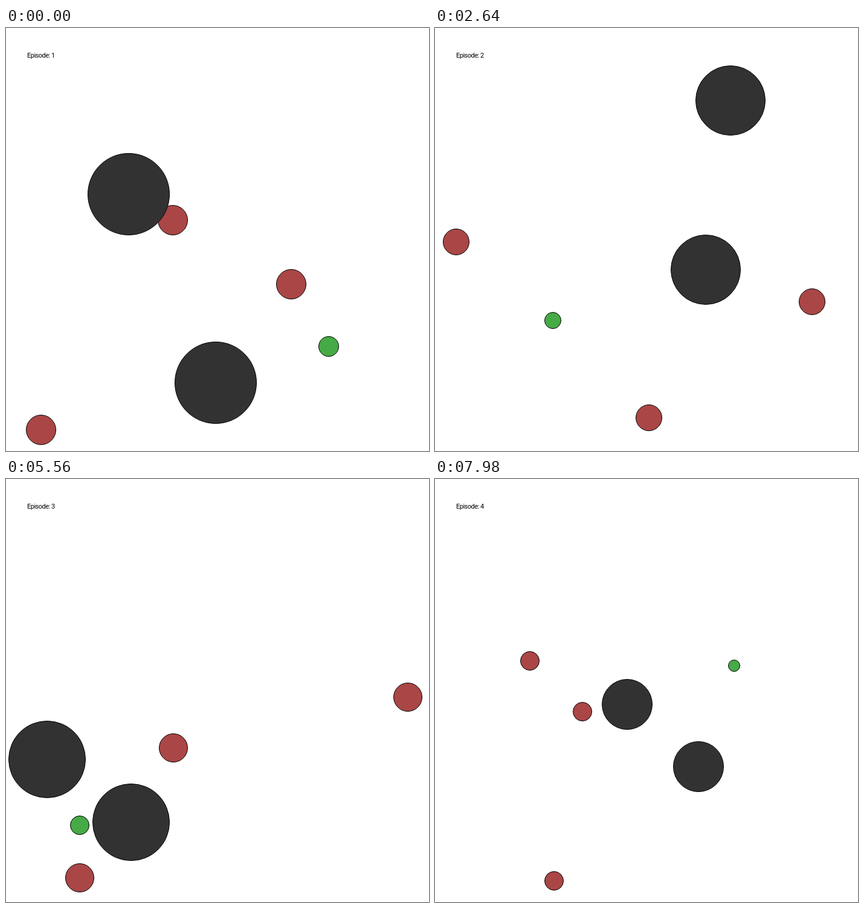
Animation, 700 px wide and 700 px high, one loop 8000 ms. Source, as an HTML page with a canvas:

```html
<!DOCTYPE html>
<html lang="en">
<head>
<meta charset="utf-8">
<title>Pursuit episodes</title>
<style>
  html, body { margin: 0; height: 100%; overflow: hidden; background: #fff; }
  canvas { display: block; }
</style>
</head>
<body>
<canvas id="stage" width="700" height="700"></canvas>
<script>
const ctx = document.getElementById('stage').getContext('2d');
const LOOP = 8000, CENTER = 350, EXTENT = 315, BODY_SCALE = 0.988;
const DT = 0.1, DRAG = 0.75, STIFFNESS = 100;

const HUNTER = { size: 0.075, color: 'rgb(170,70,70)', accel: 3, maxSpeed: 1 };
const PREY = { size: 0.05, color: 'rgb(70,170,70)', accel: 4, maxSpeed: 1.3 };
const ROCK = { size: 0.2, color: 'rgb(50,50,50)' };
const THRUST = { L: [-1, 0], R: [1, 0], U: [0, -1], D: [0, 1], N: [0, 0] };

// A plan such as "L13 U" thrusts left for 13 steps, then up for one.
const body = kind => (x, y, plan = '') => ({
  ...kind, x, y, moves: plan.replace(/(\w)(\d*) ?/g, (_, move, count) => move.repeat(count || 1))
});
const hunter = body(HUNTER), prey = body(PREY), rock = body(ROCK);

// "lead" counts the steps already taken when the episode is first seen.
const episodes = [
  {
    start: 0, lead: 0,
    movers: [
      hunter(-0.845, 0.9133, 'D30'),
      hunter(-0.2131, -0.0913, 'N9 R U5'),
      hunter(0.3554, 0.2155),
      prey(0.536, 0.516, 'N2 U8 N8 D')
    ],
    rocks: [rock(-0.4262, -0.2174), rock(-0.0072, 0.6872)]
  },
  {
    start: 2520, lead: 2,
    movers: [
      hunter(-0.8232, 0.0139, 'L30'),
      hunter(0.0139, 0.9924),
      hunter(0.92, 0.3466),
      prey(-0.5186, 0.452)
    ],
    rocks: [rock(0.4687, -0.7705), rock(0.33, 0.1692)]
  },
  {
    start: 4740, lead: 1,
    movers: [
      hunter(0.9618, -0.7878, 'D30'),
      hunter(0.128, 0.932, 'L13 U L U L2 U L U3'),
      hunter(-0.2228, 0.2916),
      prey(-0.6947, 0.7215, 'N9 U6 N3 R U')
    ],
    rocks: [rock(-0.86, 0.349), rock(-0.4345, 0.6672)]
  },
  {
    start: 6960, lead: 1,
    movers: [
      hunter(-0.8879, -0.2237),
      hunter(-0.4866, 0.1637),
      hunter(-0.7034, 0.429, 'D30'),
      prey(0.6711, -0.1868)
    ],
    rocks: [rock(-0.1453, 0.1084), rock(0.399, 0.5835)]
  }
];

// Thrust, drag, a speed limit and soft contact with the rocks.
function simulate(mover, rocks, steps) {
  let { x, y } = mover, vx = 0, vy = 0;
  for (let i = 0; i < steps; i++) {
    let [fx, fy] = THRUST[mover.moves[i] || 'N'].map(f => f * mover.accel);
    for (const r of rocks) {
      const dx = x - r.x, dy = y - r.y, distance = Math.hypot(dx, dy);
      const push = STIFFNESS * Math.max(0, mover.size + r.size - distance);
      fx += push * dx / distance;
      fy += push * dy / distance;
    }
    vx = vx * DRAG + fx * DT;
    vy = vy * DRAG + fy * DT;
    const limit = Math.min(1, mover.maxSpeed / (Math.hypot(vx, vy) || 1));
    vx *= limit;
    vy *= limit;
    x += vx * DT;
    y += vy * DT;
  }
  return { ...mover, x, y };
}

function draw(time) {
  const index = episodes.findLastIndex(e => time >= e.start);
  const { start, lead, movers, rocks } = episodes[index];
  const steps = lead + Math.max(0, 1 + Math.floor((time - start - 20) / 100));
  const bodies = [...movers.map(m => simulate(m, rocks, steps)), ...rocks];

  // The camera zooms so that the farthest body sits at the edge.
  const zoom = EXTENT / Math.max(...bodies.flatMap(b => [Math.abs(b.x), Math.abs(b.y)]));
  const toPixel = v => Math.floor(CENTER + v * zoom + 1e-6);

  ctx.fillStyle = '#fff';
  ctx.fillRect(0, 0, 700, 700);
  ctx.strokeStyle = '#000';
  ctx.lineWidth = 1;
  for (const { x, y, size, color } of bodies) {
    ctx.beginPath();
    ctx.arc(toPixel(x), toPixel(y), Math.floor(size * zoom * BODY_SCALE) - 0.5, 0, Math.PI * 2);
    ctx.fillStyle = color;
    ctx.fill();
    ctx.stroke();
  }

  ctx.fillStyle = '#000';
  ctx.font = '11px Roboto, sans-serif';
  ctx.letterSpacing = '-0.5px';
  ctx.fillText(`Episode: ${index + 1}`, 35, 49);
}

const begin = performance.now();
function tick() {
  draw((performance.now() - begin) % LOOP);
  requestAnimationFrame(tick);
}
tick();
</script>
</body>
</html>
```
